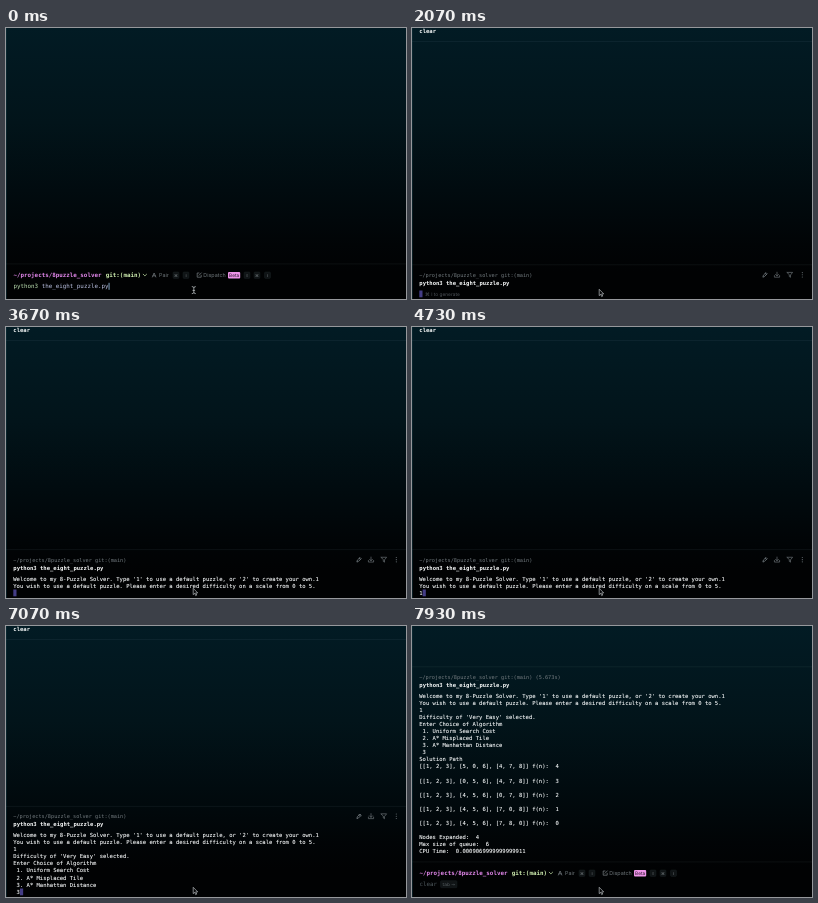
Write an HTML page that moves like this. It is 400 px wide and 271 px high and loops after 8 s.

```html
<!DOCTYPE html>
<html lang="en">
<head>
<meta charset="utf-8">
<title>Terminal puzzle solver</title>
<style>
  html, body { margin: 0; width: 100%; height: 100%; overflow: hidden; background: #000; }
  svg { display: block; width: 100vw; height: 100vh; }
  text { white-space: pre; text-rendering: geometricPrecision; font-family: "DejaVu Sans Mono", monospace; }
  .out { font-size: 5.53px; fill: #fafcfd; stroke: #fafcfd; stroke-width: .08; }
  .command { font-size: 5.55px; font-weight: 700; fill: #f8fafa; }
  .head { font-size: 5.22px; fill: #747c80; }
  .input { font-size: 5.85px; }
  .bold { font-weight: 700; }
  .ui { font-family: Inter, sans-serif; font-size: 5.4px; fill: #6f777b; }
  .key { font-family: "DejaVu Sans", sans-serif; font-size: 3.8px; fill: #7b8387; text-anchor: middle; }
  .cap { fill: #101416; stroke: #1e2427; stroke-width: .4; }
  .line { fill: none; stroke: #7b8387; stroke-width: .7; stroke-linecap: round; stroke-linejoin: round; }
  .rule { fill: #8fb0b8; opacity: .1; }
</style>
</head>
<body>
<svg viewBox="0 0 400 271" preserveAspectRatio="none">
  <defs>
    <linearGradient id="sky" x1="0" y1="0" x2="0" y2="1">
      <stop offset="0" stop-color="#021b24"/>
      <stop offset=".35" stop-color="#02141a"/>
      <stop offset=".6" stop-color="#010b0f"/>
      <stop offset=".8" stop-color="#010406"/>
      <stop offset=".9" stop-color="#010203"/>
      <stop offset="1" stop-color="#010203"/>
    </linearGradient>
  </defs>
  <rect width="400" height="271" fill="url(#sky)"/>
  <rect width=".8" height="271" fill="#12343c" opacity=".7"/>

  <g id="previous">
    <text class="command" x="7.3" y="5">clear</text>
    <rect class="rule" y="13" width="400" height=".7"/>
  </g>

  <g id="block">
    <rect class="rule" y="-10.5" width="400" height=".7"/>
    <text id="head" class="head" x="7.3" y="2"></text>
    <text class="command" x="7.3" y="9.9">python3 the_eight_puzzle.py</text>
    <g id="rows"></g>
    <rect id="cursor" width="3.2" height="6.8" fill="#443d86"/>
    <text id="hint" class="ui" x="13" y="21" style="font-size:4.8px;fill:#50555b">⌘ I to generate</text>
    <g id="tools" class="line" style="stroke:#6a7276">
      <path d="M351 1.8l.4-1.6 2.6-2.6 1.2 1.2-2.6 2.6zM353.2-1.6l1.2 1.2" stroke-width=".9"/>
      <path d="M365-2.8v3.6m-1.5-1.4 1.5 1.5 1.5-1.5M362.4.6v1.6h5.2v-1.6"/>
      <path d="M375.2-2.6h5.4l-2.1 2.6v2.3l-1.2-.7v-1.6z"/>
      <path d="M390.3-2.4v0M390.3-.2v0M390.3 2v0" stroke-width="1.1"/>
    </g>
  </g>

  <g id="prompt">
    <rect class="rule" y="235.6" width="400" height=".7"/>
    <text class="input bold" x="7.5" y="249" fill="#e388ec">~/projects/8puzzle_solver</text>
    <text class="input bold" x="99.8" y="249" fill="#cfeeb0">git:(main)</text>
    <path class="line" d="M137.2 246.2l1.7 1.7 1.7-1.7" style="stroke:#cfeeb0"/>
    <path class="line" d="M146.4 249l1.7-4 1.7 4M147 247.8h2.2"/>
    <text class="ui" x="153" y="249">Pair</text>
    <path class="line" d="M193 245h-1.8v4.2h4v-1.9M193 247.3l2.3-2.4"/>
    <text class="ui" x="197.3" y="249">Dispatch</text>
    <rect x="222" y="243.9" width="12.2" height="6.7" rx="1" fill="#ee94e8"/>
    <text class="ui" x="228.1" y="248.9" text-anchor="middle" style="font-size:4.7px;fill:#241025">Beta</text>
    <g id="keys"></g>
    <g id="typed">
      <text class="input" x="7.5" y="260"><tspan fill="#bfe3b4">python3</tspan><tspan fill="#bfc5e6"> the_eight_puzzle.py</tspan></text>
      <rect id="caret" x="102.6" y="254.8" width=".9" height="7" fill="#8fb3d6"/>
    </g>
    <g id="suggestion">
      <text class="input" x="7.5" y="260" fill="#505a5f">clear</text>
      <rect class="cap" x="28.5" y="254.7" width="16.5" height="7" rx="1"/>
      <text class="key" x="36.7" y="259.6" style="font-size:4.4px;fill:#596165">tab →</text>
    </g>
  </g>

  <path id="beam" class="line" d="M186.2 258.6q1.6 0 1.6 1v5q0 1-1.6 1M189.4 258.6q-1.6 0-1.6 1M187.8 264.6q0 1 1.6 1M186.9 262.4h1.8" style="stroke:#c9cfd2"/>
  <path id="arrow" d="M187.2 261.3v6.3l1.5-1.3 1 2.3 1-.5-1-2.2h2z" fill="#050607" stroke="#d5dadd" stroke-width=".6"/>
</svg>

<script>
const LOOP = 8000, LEFT = 7.3, PITCH = 7.07, ADVANCE = 5.53 * 0.602;
const TITLE = "~/projects/8puzzle_solver git:(main)";
const $ = id => document.getElementById(id);
const show = (id, on) => { $(id).style.display = on ? "" : "none"; };

function make(parent, tag, attrs, text = "") {
  const node = document.createElementNS("http://www.w3.org/2000/svg", tag);
  for (const name in attrs) node.setAttribute(name, attrs[name]);
  node.textContent = text;
  return parent.appendChild(node);
}

const boards = ["[5, 0, 6], [4, 7, 8]", "[0, 5, 6], [4, 7, 8]", "[4, 5, 6], [0, 7, 8]",
  "[4, 5, 6], [7, 0, 8]", "[4, 5, 6], [7, 8, 0]"];
const output = [
  "Welcome to my 8-Puzzle Solver. Type '1' to use a default puzzle, or '2' to create your own.1",
  "You wish to use a default puzzle. Please enter a desired difficulty on a scale from 0 to 5.",
  "1",
  "Difficulty of 'Very Easy' selected.",
  "Enter Choice of Algorithm",
  " 1. Uniform Search Cost",
  " 2. A* Misplaced Tile",
  " 3. A* Manhattan Distance",
  " 3",
  "Solution Path",
  ...boards.flatMap((b, i) => [`[[1, 2, 3], ${b}] f(n):  ${4 - i}`, ""]),
  "Nodes Expanded:  4",
  "Max size of queue:  6",
  "CPU Time:  0.0009069999999999911",
  ""
];
const rows = output.map((_, i) => make($("rows"), "text", { class: "out", x: LEFT, y: 20.7 + i * PITCH }));

for (const [x, label] of [[170, "⌘"], [180, "I"], [241, "⇧"], [251, "⌘"], [261.5, "I"]]) {
  make($("keys"), "rect", { class: "cap", x: x - 3, y: 244, width: 6, height: 6.4, rx: 1 });
  make($("keys"), "text", { class: "key", x, y: 248.6 }, label);
}

// Running program: start time, visible rows, cursor column on the last row
const steps = [
  [1670, 1, 0], [2400, 1, 91], [3200, 1, 92], [3530, 3, 0], [4530, 3, 1],
  [5000, 9, 1], [6530, 9, 2], [7330, 24, 0], [7400, 23, 32]
];

function draw(t) {
  const started = t >= 1670, done = t >= 7400, running = started && !done;
  show("previous", running);
  show("block", started);
  show("prompt", !running);
  show("typed", !started);
  show("caret", t < 470 || (t >= 1000 && t < 1470));
  show("suggestion", t >= 7530);
  show("beam", !started);
  show("arrow", started);
  show("tools", running && t >= 1800);
  show("cursor", running);
  show("hint", t < 2400);
  if (!started) return;

  const [, count, column] = steps.filter(s => s[0] <= t).pop();
  const top = done ? 51 : 247 - (count - 1) * PITCH;
  $("block").setAttribute("transform", `translate(0 ${top})`);
  $("head").textContent = TITLE + (done ? " (5.673s)" : "");
  rows.forEach((row, i) => {
    row.textContent = i >= count ? "" : i === count - 1 ? output[i].slice(0, column) : output[i];
  });
  $("cursor").setAttribute("x", LEFT + column * ADVANCE);
  $("cursor").setAttribute("y", 15.5 + (count - 1) * PITCH);
}

const start = performance.now();
function tick() {
  draw((performance.now() - start) % LOOP);
  requestAnimationFrame(tick);
}
tick();
</script>
</body>
</html>
```
